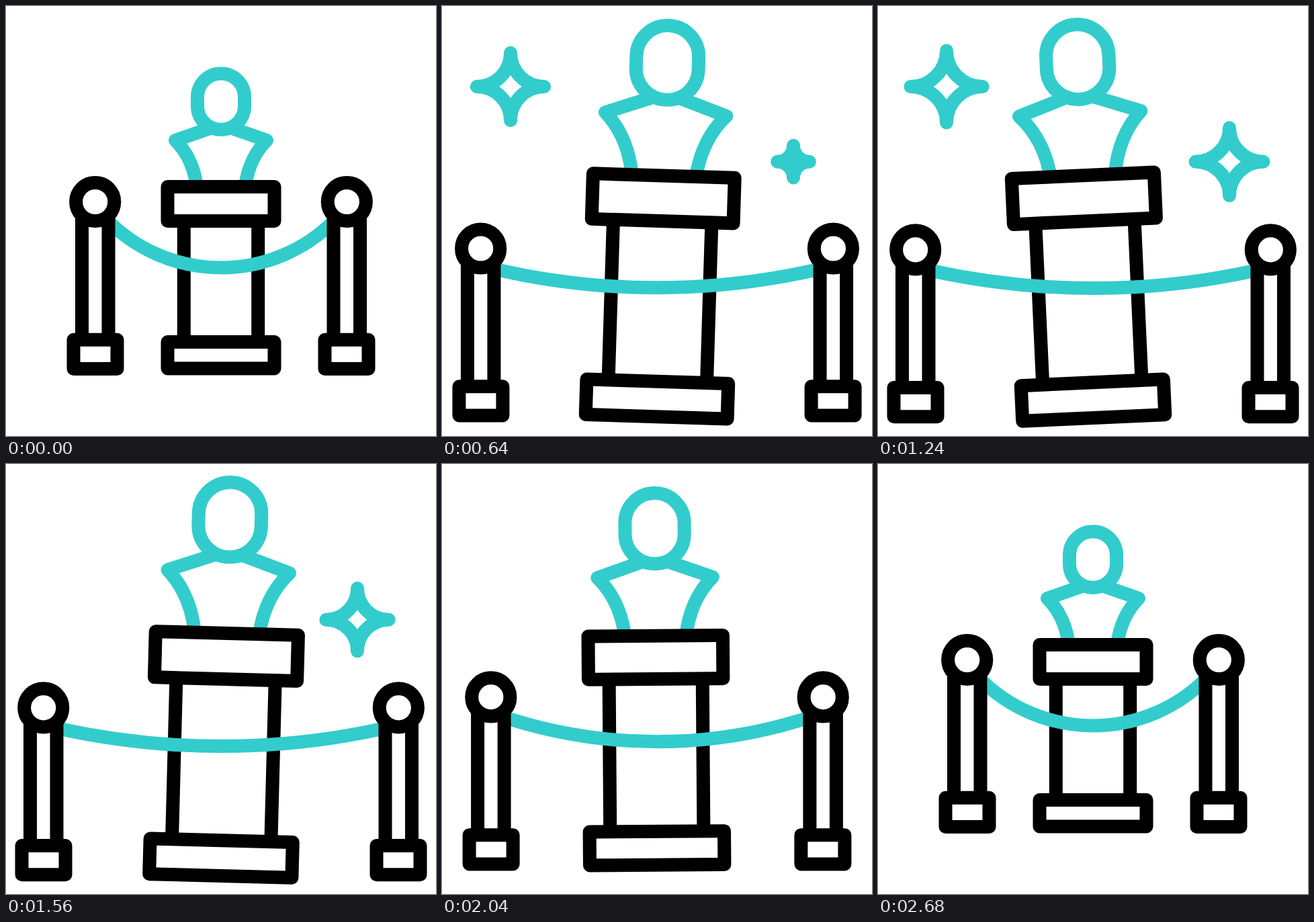
These frames come from a looping animation (640x640 px, 3000 ms). An HTML page:

```html
<!DOCTYPE html>
<html lang="en">
<head>
<meta charset="utf-8">
<title>Museum bust</title>
<style>
  html, body { margin: 0; width: 100%; height: 100%; overflow: hidden; background: #fff; }
  svg { display: block; width: 100vw; height: 100vh; }
  .ink { stroke: #000; }
  .teal { stroke: #33cccc; }
</style>
</head>
<body>
<svg viewBox="0 0 640 640" fill="none" stroke-width="20" stroke-linejoin="round">
  <defs>
    <g id="post" class="ink">
      <path d="M113 312.4V497M152.5 312.4V497"/>
      <circle cx="132.7" cy="291.5" r="28.6"/>
      <rect x="100.5" y="496.7" width="65" height="43.3"/>
    </g>
  </defs>
  <g id="statue">
    <g class="teal">
      <rect x="285" y="100.5" width="70" height="83.5" rx="35"/>
      <path d="M305 181.5L252 200Q278.5 226.5 284 269"/>
      <path d="M335 181.5L388 200Q361.5 226.5 356 269"/>
    </g>
    <g class="ink">
      <path d="M264.8 320V500M375.2 320V500"/>
      <rect x="240.5" y="269" width="159" height="51"/>
      <rect x="240.5" y="500" width="159" height="39.5"/>
    </g>
  </g>
  <path id="rope" class="teal"/>
  <use id="left" href="#post"/>
  <use id="right" href="#post"/>
  <path id="starA" class="teal" transform="translate(102 120)"/>
  <path id="starB" class="teal" transform="translate(523 231.7)"/>
</svg>
<script>
const LOOP = 3000, STEP = 40;
const el = id => document.getElementById(id);
const clamp = x => Math.min(1, Math.max(0, x));
const smooth = x => x * x * (3 - 2 * x);

// cubic-bezier(.45, 0, .2, 1)
function ease(x) {
  if (x <= 0 || x >= 1) return clamp(x);
  let lo = 0, hi = 1;
  for (let i = 0; i < 24; i++) {
    const u = (lo + hi) / 2, v = 1 - u;
    if (1.35 * v * v * u + 0.6 * v * u * u + u * u * u < x) lo = u; else hi = u;
  }
  return smooth(lo);
}

const ramp = (t, from, to) => ease((t - from) / (to - from));
const pulse = (t, a, b, c, d) => ramp(t, a, b) - ramp(t, c, d);

// Sway angles in degrees, evenly spaced in time
const SWAY = [0, 3, -5, 3, -3, 0], SWAY_START = 453, SWAY_GAP = 333;
function sway(t) {
  const p = Math.min(SWAY.length - 1, Math.max(0, (t - SWAY_START) / SWAY_GAP));
  const i = Math.min(SWAY.length - 2, Math.floor(p));
  return SWAY[i] + (SWAY[i + 1] - SWAY[i]) * smooth(p - i);
}

function star(node, r) {
  node.style.display = r > 0.2 ? "" : "none";
  const arc = (x, y) => `A${r} ${r} 0 0 0 ${x} ${y}`;
  node.setAttribute("d", `M0 ${-r}${arc(r, 0)}${arc(0, r)}${arc(-r, 0)}${arc(0, -r)}Z`);
}

function draw(t) {
  const open = pulse(t, 0, 800, 1808, 2680);
  const dx = 77 * open, dy = 71.3 * open;

  const scale = 1 + 0.335 * open;
  const statue = el("statue");
  statue.setAttribute("transform",
    `translate(320 320) scale(${scale}) translate(-320 -320) rotate(${sway(t)} 320 519.5)`);
  statue.setAttribute("stroke-width", 20 / scale);

  el("left").setAttribute("transform", `translate(${-dx} ${dy})`);
  el("right").setAttribute("transform", `translate(${640 + dx} ${dy}) scale(-1 1)`);

  const half = 168 + dx, y = 320 + 73 * open;
  const sag = 389.5 + 30.5 * open - y;
  const r = (half * half + sag * sag) / (2 * sag);
  el("rope").setAttribute("d", `M${320 - half} ${y}A${r} ${r} 0 0 0 ${320 + half} ${y}`);

  star(el("starA"), 54 * pulse(t, 93, 890, 1220, 1540));
  star(el("starB"), 50.5 * pulse(t, 355, 1150, 1500, 1840));
}

function tick(now) {
  draw(Math.floor((now % LOOP) / STEP) * STEP);
  requestAnimationFrame(tick);
}
draw(0);
requestAnimationFrame(tick);
</script>
</body>
</html>
```
